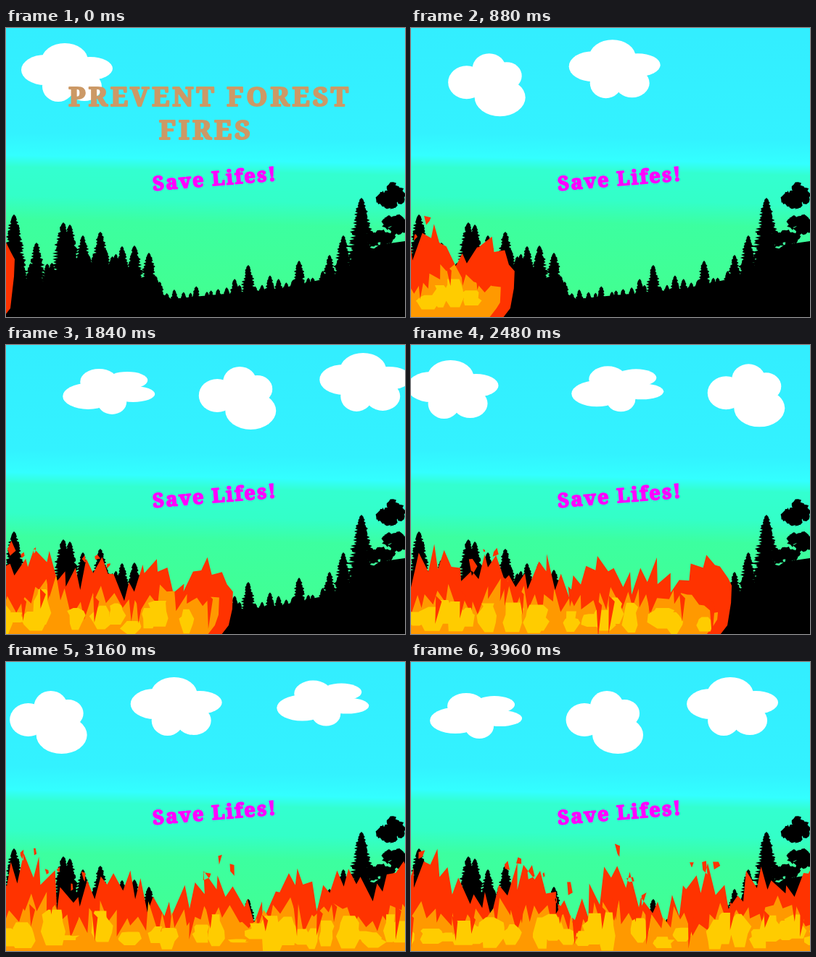
Write an HTML page that moves like this. It is 550x400 px and loops after 4000 ms.

```html
<!DOCTYPE html>
<html lang="en">
<head>
<meta charset="utf-8">
<title>Prevent Forest Fires</title>
<style>
  html, body { margin: 0; width: 100%; height: 100%; overflow: hidden; }
  svg { display: block; width: 100%; height: 100%; }
  text { font-family: "Noto Serif", "Liberation Serif", serif; font-weight: 900; stroke-linejoin: round; }
  #title { font-size: 37px; letter-spacing: 4px; text-anchor: middle; fill: #c96; stroke: #c96; stroke-width: 2.2px; }
  #slogan { font-size: 27px; letter-spacing: 2.2px; fill: #f0f; stroke: #f0f; stroke-width: 1.8px; }
</style>
</head>
<body>
<svg viewBox="0 0 550 400">
  <defs>
    <linearGradient id="sky" gradientUnits="userSpaceOnUse" x1="0" y1="0" x2="-9" y2="400">
      <stop offset="0" stop-color="#33eeff"/>
      <stop offset=".36" stop-color="#33f2ff"/>
      <stop offset=".44" stop-color="#33ffff"/>
      <stop offset=".48" stop-color="#33ffd0"/>
      <stop offset=".58" stop-color="#33ffc8"/>
      <stop offset=".66" stop-color="#3cffa0"/>
      <stop offset="1" stop-color="#44ff8c"/>
    </linearGradient>
  </defs>
  <rect width="550" height="400" fill="url(#sky)"/>
  <g id="clouds" fill="#fff"></g>
  <path id="forest"/>
  <path id="red" fill="#f30"/>
  <path id="orange" fill="#f90"/>
  <path id="yellow" fill="#fc0"/>
  <path id="streaks" fill="#f30"/>
  <g id="title">
    <text x="281" y="108">PREVENT FOREST</text>
    <text x="276" y="154">FIRES</text>
  </g>
  <text id="slogan" transform="translate(203 225) rotate(-4.7)">Save Lifes!</text>
</svg>
<script>
const LOOP = 4000, STEP = 40, FLICKER = 80, TAU = 2 * Math.PI;
const el = id => document.getElementById(id);
const rnd = (a, b = 0) => {
  const v = Math.sin(a * 127.1 + b * 311.7) * 43758.5453;
  return v - Math.floor(v);
};
const spread = (a, b, size) => (rnd(a, b) - .5) * size;
const lerp = (a, b, k) => a + (b - a) * k;
const clamp = k => Math.min(1, Math.max(0, k));
const poly = pts => 'M' + pts.map(p => p[0].toFixed(1) + ' ' + p[1].toFixed(1)).join('L') + 'Z';

// Clouds: ellipses as [cx, cy, rx, ry] from the cloud's top left corner.
// The same three pass twice, the second time faster and level.
const clouds = [
  { x: 21, y: 21, puffs: [[60, 24, 32, 24], [33, 37, 33, 21], [95, 35, 31, 16], [51, 60, 22, 21], [87, 60, 24, 20], [65, 42, 40, 22]] },
  { x: -145, y: 40, puffs: [[25, 40, 25.5, 23], [56, 21, 23, 21], [80, 31, 21, 19], [71, 61, 35, 26], [55, 42, 25, 20]] },
  { x: -333, y: 43, puffs: [[35, 38, 35, 18], [50, 18, 26, 18], [89, 16, 28, 12], [97, 35, 30, 11], [68, 46, 20, 17], [68, 32, 30, 16]] }
].flatMap(({ x, y, puffs }) => [
  { x, y, vx: .2235, vy: -.0055 },
  { x: x - 672.5, y, vx: .2605, vy: 0 }
].map(cloud => {
  cloud.node = document.createElementNS('http://www.w3.org/2000/svg', 'g');
  cloud.node.innerHTML = puffs.map(([cx, cy, rx, ry]) =>
    `<ellipse cx="${cx}" cy="${cy}" rx="${rx}" ry="${ry}"/>`).join('');
  el('clouds').append(cloud.node);
  return cloud;
}));

// Forest: a valley floor, tall trees at key places, seeded small ones
const floor = [[0, 335], [50, 355], [95, 328], [145, 330], [228, 375], [375, 361], [450, 345], [515, 300], [550, 295]];
const landmarks = [
  [11, 258], [42, 297], [79, 269], [88, 272], [106, 287], [130, 282], [160, 302], [177, 301],
  [197, 311], [334, 328], [404, 322], [446, 314], [465, 287], [490, 235]
];

function floorAt(x) {
  const i = Math.max(1, floor.findIndex(p => p[0] >= x));
  const [x0, y0] = floor[i - 1], [x1, y1] = floor[i];
  return lerp(y0, y1, (x - x0) / (x1 - x0));
}

function conifer([x, top]) {
  const base = floorAt(x) + 8, width = 2 + .19 * (base - top), left = [], right = [];
  for (let y = top, i = 0; y < base; y += 2, i++) {
    const reach = width * Math.pow((y - top) / (base - top), .65);
    const branch = side => 1 + reach * ((i % 2 ? .8 : .45) + rnd(x + i, side) * .5);
    left.unshift([x - branch(1), y + 1]);
    right.push([x + branch(2), y + 1]);
  }
  return poly([[x, top], ...right, [x, base + 6], ...left]);
}

function foliage([cx, cy, rx, ry], seed) {
  let path = '';
  for (let n = 0; n < 32; n++) {
    const a = rnd(n, seed) * TAU, r = Math.sqrt(rnd(n, seed + 9));
    const leaf = i => {
      const b = i / 9 * TAU, size = 3 + rnd(n * 9 + i, seed) * 5;
      return [cx + rx * r * Math.cos(a) + size * Math.cos(b), cy + ry * r * Math.sin(a) + size * Math.sin(b)];
    };
    path += poly(Array.from({ length: 9 }, (_, i) => leaf(i)));
  }
  return path;
}

const saplings = [];
for (let x = 4; x < 450; x += 10) {
  saplings.push([x + spread(x, 2, 6), floorAt(x) - (x < 200 ? 12 : 5) - rnd(x, 1) * 15]);
}
const crowns = [[532, 233, 19, 15], [538, 272, 17, 9], [516, 291, 17, 6]];
el('forest').setAttribute('d', poly([...floor, [550, 400], [0, 400]]) +
  [...landmarks, ...saplings].map(conifer).join('') + crowns.map(foliage).join(''));

// Fire: waves travel with the front, then settle into fixed hollows on the left
function fireAt(t) {
  const front = Math.min(592, 12 + .135 * t + 1.55e-5 * t * t);
  const settled = clamp((t - 2400) / 900);
  const top = d => {
    const x = front - d;
    const travelling = 17 * Math.cos(TAU * d / 74);
    const hollows = 27 * Math.cos(TAU * (x - 95) / 125);
    return 317 - 24 * ((x - 275) / 275) ** 2 + lerp(travelling, hollows, settled * clamp((430 - x) / 60));
  };
  return { front, top };
}

function layer(front, seed, top, inset, gap, rough) {
  const edge = front - inset, start = top(inset) + 8;
  const pts = [[edge - 16, 401], [edge - 6, 388], [edge - 1, Math.min(380, start + 24)], [edge, start]];
  for (let n = 1, d = gap; edge - d > -2 * gap; n++, d += gap) {
    const amount = Math.min(1, .3 + d / 200) * rough;
    const spike = n % 2 ? 4 + rnd(n, seed) * 26 : -rnd(n, seed) * 16;
    pts.push([edge - d + spread(n, seed + 7, gap * 1.3), top(d + inset) + spike * amount]);
  }
  return poly([...pts, [-20, 401]]);
}

function tongue(x, top, bottom, width, seed) {
  const sides = [1, -1].map(side => [0, .2, .4, .65, 1].map((k, i) => [
    x + side * width * (.12 + .38 * Math.sin(Math.PI * (.1 + .75 * k))) + spread(i + side * 9, seed, width * .3),
    lerp(top, bottom, k) + spread(i, seed + 3, 6)
  ]));
  return poly([...sides[0], ...sides[1].reverse()]);
}

function shard(x, y, size, seed) {
  return poly([0, 1, 2, 3].map(i => {
    const a = (i + rnd(i, seed) * .8) / 4 * TAU, r = size * (.3 + rnd(i, seed + 1) * .8);
    return [x + r * .55 * Math.cos(a), y + r * Math.sin(a)];
  }));
}

function drawFire(t) {
  const tick = Math.floor(t / FLICKER), { front, top } = fireAt(tick * FLICKER);
  const inner = d => Math.max(top(d) + 20, 346 + 11 * Math.sin(d / 13 + tick) + 7 * Math.sin(d / 29 - tick));
  let red = layer(front, tick, top, 0, 9, 1), streaks = '', yellow = '';

  // loose flame tips above the older part of the fire
  for (let n = 0, d = 120; d < front; n++, d += 17) {
    if (rnd(Math.floor(n / 3), tick + 3) < .5) continue;
    red += shard(front - d, top(d) + 6 - rnd(n, tick + 5) * 38, 5 + rnd(n, tick + 9) * 9, tick + n);
  }
  for (let n = 0, d = 38; front - d > -15; n++, d += 20) {
    const x = front - d + spread(n, tick + 11, 12), y = inner(d);
    if (rnd(n, tick + 13) < .8) {
      yellow += tongue(x, y + 3 + rnd(n, tick + 15) * 20, 385 + rnd(n, tick + 17) * 16, 19 + rnd(n, tick + 19) * 15, tick + n);
    }
    if (rnd(n, tick + 21) < .5) {
      streaks += poly([[x + 7, y - 8], [x + 15, y], [x + 10 + spread(n, tick, 8), y + 15 + rnd(n, tick + 23) * 32]]);
    }
  }
  el('red').setAttribute('d', red);
  el('orange').setAttribute('d', front > 40 ? layer(front, tick + 31, inner, 19, 8, .9) : '');
  el('yellow').setAttribute('d', yellow);
  el('streaks').setAttribute('d', streaks);
}

function draw() {
  const t = Math.floor(performance.now() % LOOP / STEP) * STEP;
  for (const c of clouds) c.node.setAttribute('transform', `translate(${c.x + c.vx * t} ${c.y + c.vy * t})`);
  el('title').setAttribute('opacity', clamp(1 - t / 800));
  drawFire(t);
  requestAnimationFrame(draw);
}
draw();
</script>
</body>
</html>
```
